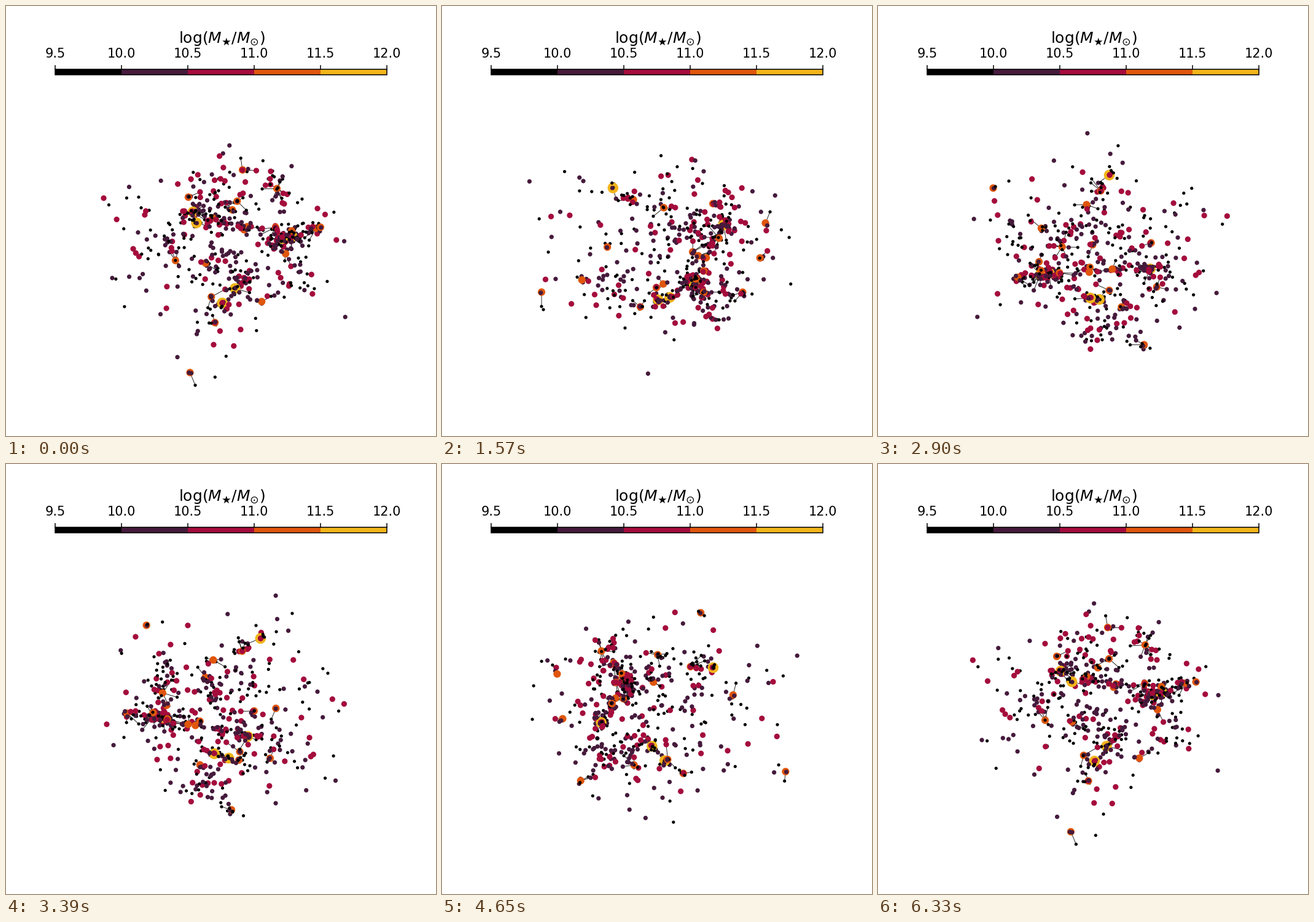
Recreate the animation shown at these times as a matplotlib script. Size 700 px wide and 700 px high, loop 6400 ms.

```python
import numpy as np
import matplotlib.pyplot as plt
from matplotlib.animation import FuncAnimation
from matplotlib.collections import LineCollection
from matplotlib.colors import to_rgba_array
from matplotlib.patches import Rectangle

SIZE, DPI = 700, 100
LOOP, FRAMES = 6400, 91
CX, CY, DIST = 357, 410, 2920
ELEV = np.radians(30)
COLORS = to_rgba_array(["#000000", "#451a3b", "#a40c3c", "#e0560c", "#f2b51a"])
DIAMETER = np.array([5.2, 7.2, 9.2, 12.2, 17.5])  # pixels, per mass bin
AREA = (DIAMETER * 72 / DPI) ** 2
REACH = 28  # longest link between a galaxy and its halo
rng = np.random.default_rng(11)

# Key points: (right, toward the viewer, up) in pixels at the start.
MAIN = np.array([(-5, 5, -83), (16, -13, -66), (-45, 76, 107),
                 (-54, -105, 28), (110, -46, 14), (94, -43, 12)], float)
MEMBERS = [10, 14, 10, 45, 60, 50]
MINOR = np.array([(-83, -57, -38), (-34, -138, -90), (31, -58, 20),
                  (98, 2, 9), (150, -58, 23), (19, -3, 103), (29, -165, 76),
                  (85, -86, 82), (-17, 34, -103), (57, 130, -4),
                  (-61, -88, 65), (-20, 44, 98), (12, -160, 2),
                  (-55, 198, -92), (-23, 7, -70), (148, 90, 107),
                  (83, -63, 22)], float)
CLUMPS = np.array([(23, -80, -80), (-92, -70, 0), (0, -100, 84),
                   (80, -75, 98), (-10, -100, -58), (12, -10, 75),
                   (124, 80, 15)], float)
# strands between pairs of halos
STRANDS = [(MAIN[5], MAIN[3]), (MAIN[1], MAIN[5]), (MAIN[0], MAIN[1]),
           (MAIN[0], MINOR[8]), (MAIN[4], MINOR[4]), (MAIN[2], MINOR[11])]


def halo(centre, n):
    """Galaxies around a centre, dense inside with a thin tail."""
    way = rng.normal(size=(n, 3))
    way /= np.linalg.norm(way, axis=1, keepdims=True)
    radius = rng.exponential(3.6 * np.cbrt(n), (n, 1))
    return centre + way * radius * (1.3, 0.9, 0.8)


def strand(start, end):
    n = int(np.linalg.norm(end - start) / 6)
    t = rng.uniform(0, 1, (n, 1))
    return start + (end - start) * t + rng.normal(0, 4, (n, 3))


def field(n):
    """Loose galaxies in a box turned by 32 degrees."""
    a, b = rng.uniform(-160, 160, (2, n))
    c, s = np.cos(np.radians(32)), np.sin(np.radians(32))
    return np.c_[a * c + b * s, b * c - a * s, rng.uniform(-115, 120, n)]


def build():
    giants = np.concatenate([MAIN, MINOR])
    light = np.concatenate(
        [halo(p, n) for p, n in zip(MAIN, MEMBERS)]
        + [halo(p, rng.integers(2, 7)) for p in MINOR]
        + [p + rng.normal(0, 17, (18, 3)) for p in CLUMPS]
        + [strand(*ends) for ends in STRANDS]
        + [field(190)])
    bins = np.concatenate([
        np.full(len(MAIN), 4), np.full(len(MINOR), 3),
        rng.choice(4, len(light), p=[0.41, 0.37, 0.21, 0.01])])

    # each galaxy close enough is tied to its nearest giant
    gaps = np.linalg.norm(light[:, None] - giants, axis=2)
    near = gaps.min(axis=1) < REACH
    links = np.stack([giants[gaps.argmin(axis=1)], light], axis=1)[near]
    return np.concatenate([giants, light]), bins, links


def project(xyz, turn):
    u, w, z = np.moveaxis(xyz, -1, 0)
    c, s = np.cos(turn), np.sin(turn)
    u, w = u * c - w * s, w * c + u * s
    depth = w * np.cos(ELEV) + z * np.sin(ELEV)
    zoom = 1 / (1 - depth / DIST)
    x = CX + u * zoom
    y = CY + (w * np.sin(ELEV) - z * np.cos(ELEV)) * zoom
    return np.stack([x, y], axis=-1), depth


def draw_colorbar(ax):
    left, top, step, height = 80, 102.5, 108, 9.5
    for i, color in enumerate(COLORS):
        ax.add_patch(Rectangle((left + i * step, top), step, height,
                               fc=color, lw=0))
    ax.add_patch(Rectangle((left, top), 5 * step, height, fc="none",
                           ec="black", lw=1.1))
    for i in range(6):
        x = left + i * step
        ax.plot([x, x], [top, top - 6], color="black", lw=1.1)
        ax.text(x, 84, f"{9.5 + i / 2:.1f}", fontsize=15, ha="center",
                va="baseline")
    ax.text(351, 60, r"$\log(M_{\bigstar}/M_{\odot})$", fontsize=18,
            ha="center", va="baseline")


points, bins, links = build()

plt.rcParams["font.family"] = "DejaVu Sans"
fig = plt.figure(figsize=(SIZE / DPI, SIZE / DPI), dpi=DPI, facecolor="white")
ax = fig.add_axes([0, 0, 1, 1])
ax.set_xlim(0, SIZE)
ax.set_ylim(SIZE, 0)
ax.axis("off")
ax.set_autoscale_on(False)
draw_colorbar(ax)

lines = LineCollection([], colors="black", linewidths=0.6, zorder=2)
ax.add_collection(lines)
dots = ax.scatter(points[:, 0], points[:, 1], linewidths=0, zorder=3)


def update(i):
    turn = 2 * np.pi * i / FRAMES
    lines.set_segments(project(links, turn)[0])
    place, depth = project(points, turn)
    order = np.argsort(depth)  # nearest drawn last
    dots.set_offsets(place[order])
    dots.set_sizes(AREA[bins[order]])
    dots.set_facecolors(COLORS[bins[order]])
    return lines, dots


anim = FuncAnimation(fig, update, frames=FRAMES, interval=LOOP / FRAMES,
                     repeat=True, repeat_delay=0)
plt.show()
```
